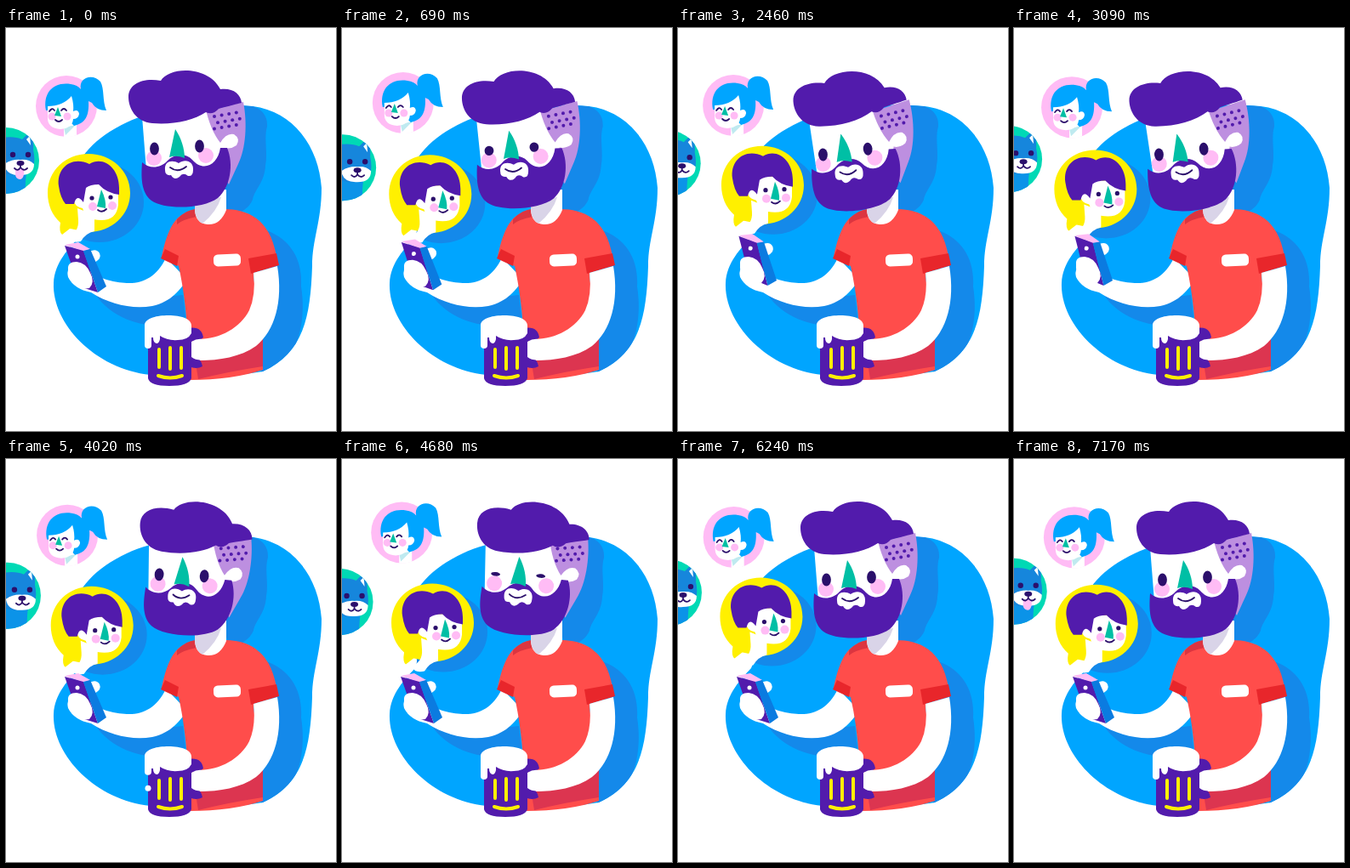
These frames come from a looping animation (388x474 px, 7200 ms). An HTML page:

```html
<!DOCTYPE html>
<html lang="en">
<head>
<meta charset="utf-8">
<style>
html, body { margin: 0; width: 100%; height: 100%; overflow: hidden; background: #fff; }
svg { display: block; width: 388px; height: 474px; }
.blue { fill: #00a5ff } .shade { fill: #1489ea } .purple { fill: #521bac } .red { fill: #ff4d4b }
.cuff { fill: #e8262b } .white { fill: #fff } .green { fill: #00bfa5 } .yellow { fill: #fff000 }
.pink { fill: #ffbcf5 } .lilac { fill: #bd8fe0 } .dark { fill: #2b0f6b } .grey { fill: #d9d4e8 }
.line { fill: none; stroke: #2b0f6b; stroke-width: 1.8; stroke-linecap: round }
.gold { fill: none; stroke: #fff000; stroke-width: 4; stroke-linecap: round }
</style>
</head>
<body>
<svg viewBox="0 0 388 474">
  <defs>
    <path id="blob" d="M56 300C57 276 74 259 86 246C94 230 76 212 78 182C82 152 106 128 142 111C184 91 248 88 290 92C338 98 368 140 371 188C371 228 360 248 360 280C358 340 350 382 302 404C254 412 208 411 170 408C104 401 54 347 56 300Z"/>
    <clipPath id="inBlob"><use href="#blob"/></clipPath>
    <clipPath id="inDog"><circle cx="0" cy="156" r="39"/></clipPath>
  </defs>

  <use href="#blob" class="blue"/>
  <g clip-path="url(#inBlob)" class="shade">
    <path id="headShade" d="M262 88L290 92Q308 98 307 116C303 130 308 146 305 162C304 182 292 190 290 202Q284 216 262 222L240 150Z"/>
    <path d="M306 238C334 248 349 272 347 304C353 342 344 376 328 392L300 405V240Z"/>
    <path d="M100 304C118 344 176 362 211 340L208 314L150 320Z"/>
    <ellipse id="chatShade" cx="110" cy="205" rx="52" ry="47"/>
  </g>

  <!-- chat bubble with a woman -->
  <g id="chat">
    <path class="yellow" d="M97 148C124 148 146 168 146 194C146 220 124 240 97 240C88 240 80 236 75 236L66 243Q62 240 64 229C54 220 49 208 49 194C49 168 70 148 97 148Z"/>
    <path class="white" d="M84 212L104 220V239Q94 241 88 251Q76 254 73 245Q86 240 85 226Z"/>
    <path class="white" d="M90 184H132V208Q130 226 112 226Q94 226 90 212Q80 210 80 202Q82 195 89 197Z"/>
    <path class="purple" d="M62 186C59 164 78 150 98 160C114 150 133 164 133 188V196Q118 194 109 184Q99 184 94 188L91 205Q83 194 80 207H70Q64 200 62 186Z"/>
    <circle class="pink" cx="102" cy="210" r="5"/><circle class="pink" cx="125" cy="209" r="5"/>
    <path class="green" d="M112 190Q118 202 117 212L107 210Z"/>
    <circle class="dark" cx="101" cy="200" r="2.6"/><circle class="dark" cx="123" cy="199" r="2.6"/>
    <path class="line" d="M108 214Q113 218 118 213"/>
  </g>

  <!-- girl with a ponytail -->
  <g id="girl">
    <circle class="pink" cx="71" cy="92" r="36"/>
    <path class="white" d="M68 108H83V126Q76 129 68 128Z"/>
    <path fill="#bfeaf0" d="M68 117L82 114L70 126Z"/>
    <path class="blue" d="M47 97C43 76 56 63 76 66Q84 67 88 72C85 58 102 53 111 63C116 72 113 86 118 97Q106 97 101 88L97 86C98 102 94 112 80 115L60 95Z"/>
    <path class="white" d="M49 92Q67 92 77 80Q80 90 79 98Q85 95 86 101Q85 107 79 107Q78 118 64 119Q49 118 49 106Z"/>
    <circle class="pink" cx="54" cy="104" r="4.5"/><circle class="pink" cx="72" cy="104" r="4.5"/>
    <path class="green" d="M61 93L65 104L57 103Z"/>
    <path class="line" stroke-width="1.4" d="M51 98Q54 93 57 97M65 97Q68 93 71 97M58 108Q62 112 66 108"/>
  </g>

  <!-- dog -->
  <g id="dog">
    <circle cx="0" cy="156" r="39" fill="#00d9b5"/>
    <g clip-path="url(#inDog)">
      <path fill="#0b93e8" d="M-8 166H25Q22 178 23 200H-10Z"/>
      <path fill="#1686dc" d="M-10 130Q8 126 19 131L28 122Q33 129 32 143Q36 162 28 169Q10 178-10 168Z"/>
      <path class="white" d="M24 131L28 127L29 138Z"/>
      <path class="white" d="M-2 160Q7 154 17 155Q27 154 33 160Q33 173 17 173Q0 174-2 160Z"/>
    </g>
    <path id="tongue" class="pink" d="M11 166H21V172Q20 178 16 178Q11 177 11 172Z"/>
    <circle class="dark" cx="8" cy="149" r="3.2"/><circle class="dark" cx="26" cy="149" r="3.2"/>
    <ellipse class="dark" cx="17" cy="159" rx="4.5" ry="3"/>
    <path class="line" d="M17 160V164M10 165Q14 169 17 164Q21 169 25 165"/>
  </g>

  <!-- body -->
  <path class="white" d="M188 270C178 293 160 301 142 300Q124 299 110 293L82 275Q70 282 73 293Q80 307 100 311C122 325 148 331 172 327C195 322 205 307 213 296Z"/>
  <path class="red" d="M183 269C188 246 194 227 208 219Q216 213 226 213H256C284 213 310 224 318 268L291 288C293 320 302 352 302 402Q266 414 216 414C214 374 214 330 203 280Z"/>
  <path fill="#dc3540" d="M201 225Q212 213 226 213L224 222Q208 225 201 231Z"/>
  <path class="cuff" d="M182 271L187 260L203 268L201 280Z"/>
  <path class="cuff" d="M285 271L318 265L321 279L288 289Z"/>
  <path fill="#dc3550" d="M222 388Q274 386 302 360V398Q262 404 226 413Z"/>
  <path class="white" d="M291 288L319 280C326 322 316 356 294 374C276 387 250 391 228 391L218 372L226 366C252 366 276 352 286 332Q294 314 291 288Z"/>
  <rect class="white" x="244" y="266" width="32" height="14" rx="5" transform="rotate(-2 260 273)"/>
  <path class="white" d="M222 190H259V214Q252 232 237 231Q223 230 222 214Z"/>
  <path class="grey" d="M222 204L253 199Q248 216 231 230Q223 226 222 214Z"/>

  <!-- phone and hand -->
  <g id="phone">
    <path class="white" d="M96 264Q106 258 110 265Q113 271 104 276Z"/>
    <path class="pink" d="M69 255L85 252L99 260L91 263Z"/>
    <path class="purple" d="M69 256L91 262L108 311L86 304Z"/>
    <path fill="#0b7be0" d="M91 262L99 260L118 304L108 311Z"/>
    <circle class="white" cx="84" cy="269" r="2.5"/>
  </g>
  <path id="hand" class="white" d="M73 284Q72 275 83 275Q94 276 99 288Q105 299 98 306Q87 308 78 300Q72 293 73 284Z"/>

  <!-- mug -->
  <path class="purple" d="M214 353Q230 350 232 364Q226 369 219 368V386Q230 389 231 398Q224 402 215 398Z"/>
  <path class="white" d="M218 369Q227 363 238 368L236 390Q224 392 218 387Z"/>
  <path class="purple" d="M167 355H218V412Q215 421 192 421Q169 421 167 412Z"/>
  <path class="white" d="M163 349C164 341 178 338 191 338C206 338 218 342 218 350V359Q214 367 202 367Q190 368 181 362V366Q180 371 177 371Q173 370 173 364H163Z"/>
  <rect id="drip" class="white" x="163" y="348" width="8" rx="4"/>
  <circle id="drop" class="white" cx="167" r="3.5"/>
  <path class="gold" d="M180 378V399M193 376V401M206 376V400M179 409Q193 414 207 409"/>

  <!-- head -->
  <g id="head">
    <path class="lilac" d="M228 100L279 87C284 112 282 142 273 160L262 184L240 150Z"/>
    <g id="stubble" class="purple"></g>
    <path class="white" d="M160 104L234 92Q240 120 252 135Q259 123 268 125Q276 130 271 138Q264 143 257 141L250 180H166Z"/>
    <g id="face">
      <path class="purple" d="M160 158C170 167 182 164 189 157C198 147 212 147 219 155C232 170 249 161 252 141L260 141C268 160 264 187 249 200C232 213 186 214 171 203C158 193 159 173 160 158Z"/>
      <path class="white" d="M187 167C186 156 196 155 203 159C211 153 221 157 220 167Q220 175 214 174Q208 169 204 175Q198 180 194 173Q187 174 187 167Z"/>
      <path class="line" stroke-width="2.2" d="M193 164Q202 171 212 163"/>
      <circle class="pink" cx="174" cy="153" r="9"/><circle class="pink" cx="235" cy="150" r="9"/>
      <path id="nose" class="green" d="M199 119C206 129 210 142 210 153Q200 149 192 152Z"/>
      <ellipse class="eye dark" cx="174.5" cy="142" rx="5.4"/>
      <ellipse class="eye dark" cx="227.5" cy="139" rx="5.4"/>
    </g>
    <path id="hair" class="purple" d="M144 81C144 65 162 58 182 62C192 45 238 44 252 72C266 70 276 77 277 88C266 91 256 93 250 95Q243 103 235 99C220 109 196 114 172 112C152 110 144 94 144 81Z"/>
  </g>
</svg>
<script>
const LOOP = 7200;
const $ = id => document.getElementById(id);
const eyes = document.querySelectorAll('.eye');
const clamp = x => Math.max(0, Math.min(1, x));
const move = (id, x, y, extra = '') => $(id).setAttribute('transform', `translate(${x} ${y}) ${extra}`);
const ease = x => x < .5 ? 2 * x * x : 1 - 2 * (1 - x) ** 2;
const step = (t, from, to) => ease(clamp((t - from) / (to - from)));

// Head pose: -1 looks at the phone, 0 rests, 1 leans back.
const pose = t => -step(t, 450, 1020) + 2 * step(t, 3270, 4150) - step(t, 5400, 6000);

const blinks = [765, 2050, 2700, 4650, 6450, 7000];
const drops = [1330, 3955, 6580];
const FALL = 270;

for (let row = 0; row < 3; row++)
  for (let i = 0; i < 4; i++)
    $('stubble').innerHTML += `<circle r="2" cx="${245 + i * 8.6 + row % 2 * 4}" cy="${104 + row * 7.2 - i * 1.5}"/>`;

function draw(t) {
  const w = t / 3600 * 2 * Math.PI, c = Math.cos(w) - 1, s = Math.sin(w);
  move('chat', -4 * c + 4 * s, 4 * c + 4 * s);
  move('chatShade', -4 * c + 4 * s, 4 * c + 4 * s);
  move('girl', 2.5 * c + 2.6 * s, 2.4 * c - 2.6 * s);
  move('dog', 5.5 * c + 5 * s, -5.5 * c + 5 * s);
  const out = clamp(t < 3600 ? (400 - t) / 200 : (t - 6650) / 200);
  move('tongue', 0, 166 * (1 - out), `scale(1 ${out})`);

  const h = pose(t), left = Math.max(0, -h), right = Math.max(0, h);
  const angle = 5.7 * right - 4 * left;
  $('head').setAttribute('transform', `rotate(${angle} 235 190)`);
  move('face', right - left, 2.5 * left - right);
  move('nose', right - 2 * left, 0);
  move('hair', 4 * right - left, 2 * right - left);
  move('headShade', right - left, 0);
  move('phone', -2 * left, -8 * left, `rotate(${5 * left} 107 305)`);
  move('hand', 0, -6 * left);

  const near = Math.min(...blinks.map(b => Math.abs(t - b)));
  const open = Math.max(.12, clamp(near / 100));
  eyes.forEach(e => e.setAttribute('ry', 7.5 * open));

  // Foam swells, lets a drop go and swells again.
  const since = Math.min(...drops.map(d => (t - d + LOOP) % LOOP));
  const until = Math.min(...drops.map(d => (d - t + LOOP) % LOOP));
  const tip = 371 + 6 * clamp(since / 550) + 4 * clamp(1 - until / 300);
  $('drip').setAttribute('height', tip - 348);
  $('drop').setAttribute('visibility', since < FALL ? 'visible' : 'hidden');
  $('drop').setAttribute('cy', 379 + since * .125);
}

function frame(now) {
  draw(Math.floor(now % LOOP / 30) * 30);
  requestAnimationFrame(frame);
}
draw(0);
requestAnimationFrame(frame);
</script>
</body>
</html>
```
